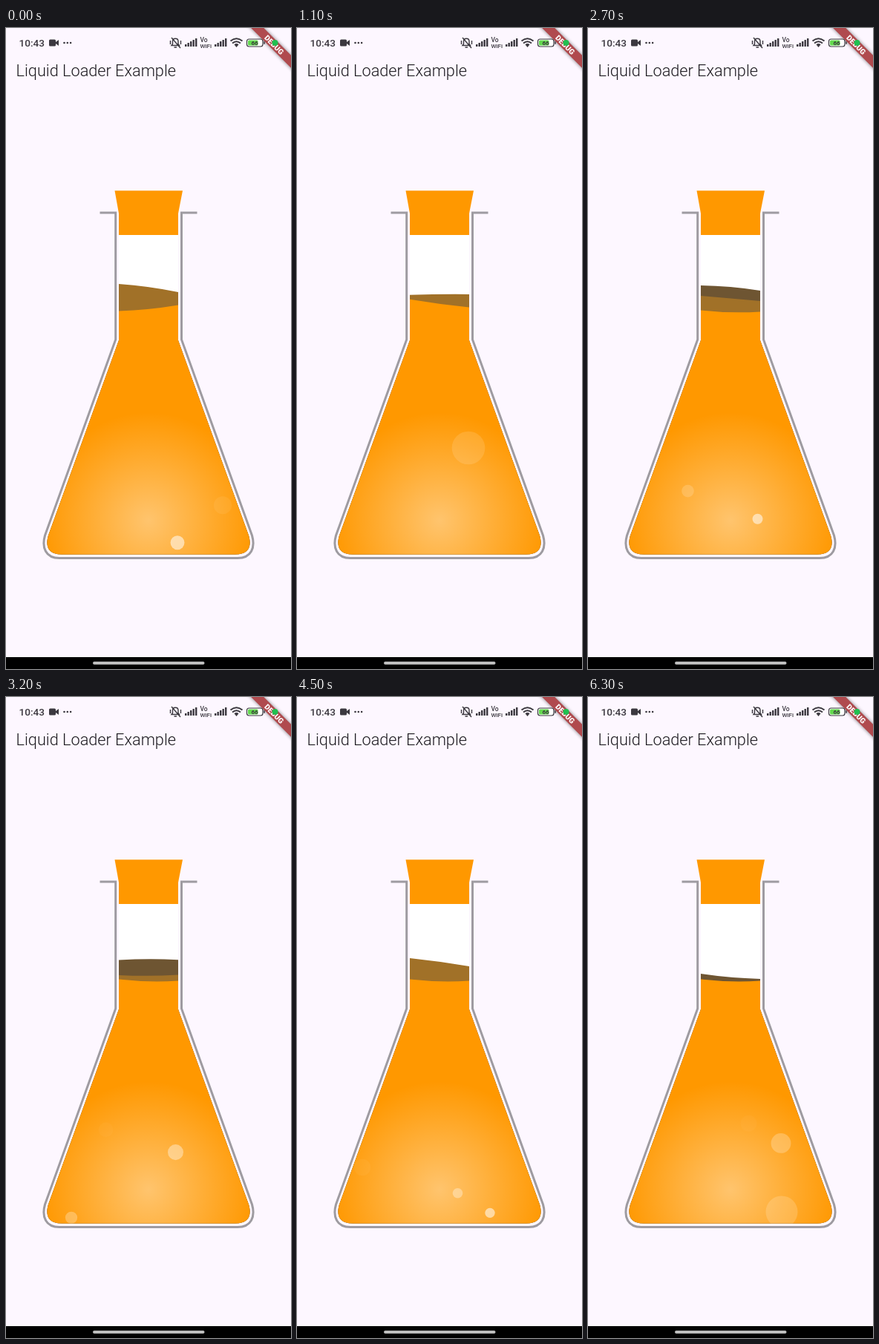
Animation of 384 by 864 pixels, one loop 6.4 s. Source, as an HTML page:

```html
<!DOCTYPE html>
<html lang="en">
<head>
<meta charset="utf-8">
<title>Liquid loader</title>
<style>
  html, body { margin: 0; width: 100%; height: 100%; overflow: hidden; background: #fdf7ff; }
  svg { display: block; width: 384px; height: 864px; font-family: Roboto, sans-serif; }
</style>
</head>
<body>
<svg viewBox="0 0 384 864" xmlns="http://www.w3.org/2000/svg">
  <defs>
    <radialGradient id="glow" gradientUnits="userSpaceOnUse" cx="192" cy="664" r="146">
      <stop offset="0" stop-color="#fff" stop-opacity=".43"/>
      <stop offset="1" stop-color="#fff" stop-opacity="0"/>
    </radialGradient>
    <path id="body" d="M152 279H232V421L327 684C331 698 328 709.5 309 709.5H75C56 709.5 53 698 57 684L152 421Z"/>
    <clipPath id="inside"><use href="#body"/></clipPath>
    <filter id="soft" x="-20%" y="-60%" width="140%" height="220%"><feGaussianBlur stdDeviation="2.5"/></filter>
    <path id="bars" d="M1.2 10V7M4.7 10V5M8.2 10V3M11.7 10V1M15.2 10V-1" stroke="#3b383f" stroke-width="2.4"/>
  </defs>
  <rect width="384" height="864" fill="#fdf7ff"/>
  <text x="13.5" y="65" font-size="21.7" font-weight="300" fill="#1d1b20">Liquid Loader Example</text>

  <!-- corner ribbon -->
  <g transform="translate(384 0) rotate(45)">
    <rect x="-45" y="26" width="90" height="12" opacity=".5" filter="url(#soft)"/>
    <rect x="-45" y="26" width="90" height="12" fill="#b04a4e"/>
    <text y="35.600" font-size="10" font-weight="900" fill="#fff" text-anchor="middle">DEBUG</text>
  </g>

  <!-- status bar -->
  <g fill="#3b383f">
    <text x="17.5" y="25" font-size="13.6" font-weight="500">10:43</text>
    <rect x="58" y="15.5" width="9" height="9" rx="1.5"/>
    <path d="M67 19L71 16V24L67 21Z"/>
    <circle cx="78.5" cy="20" r="1.3"/><circle cx="82.8" cy="20" r="1.3"/><circle cx="87.1" cy="20" r="1.3"/>
    <path d="M223 23.5H233.5L232 21.5V18C232 13 224.5 13 224.5 18V21.5ZM226.5 26H230M223 13L235 27M221.5 17V22M235.5 17V22" fill="none" stroke="#3b383f" stroke-width="1.4"/>
    <use href="#bars" x="241" y="15"/>
    <text x="261.5" y="19" font-size="8.5" font-weight="500">Vo</text>
    <text x="261.5" y="26.5" font-size="8" font-weight="500">WiFi</text>
    <use href="#bars" x="281" y="15"/>
    <path d="M302.500 17.500Q310.500 11 318.500 17.500M305 20.500Q310.500 16 316 20.500" fill="none" stroke="#3b383f" stroke-width="2"/>
    <path d="M307.500 22.200Q310.500 20 313.500 22.200L310.500 26Z"/>
    <rect x="324.500" y="15" width="21.500" height="10" rx="3" fill="#fff" stroke="#3b383f" stroke-width="1.2"/>
    <rect x="326" y="16.500" width="13.500" height="7" rx="1.500" fill="#62d84e"/>
    <text x="335" y="22.900" font-size="8" font-weight="700" text-anchor="middle">66</text>
    <rect x="347.300" y="18" width="1.500" height="4" rx=".7"/>
    <circle cx="362.500" cy="20" r="4" fill="#20c050"/>
  </g>

  <!-- flask -->
  <use href="#body" fill="#fff"/>
  <g clip-path="url(#inside)">
    <path id="back" fill="#6e5532"/>
    <path id="mid" fill="#a17128"/>
    <path id="front" fill="#ff9800"/>
    <rect x="40" y="500" width="304" height="220" fill="url(#glow)"/>
    <g id="bubbles" fill="#fff"/>
  </g>
  <path d="M146.500 219.200H238L232 250V279H152V250Z" fill="#ff9800"/>
  <path d="M126.500 249H147.700V420L52.500 684C48 700 53 714.500 72 714.500H312C331 714.500 336 700 331.500 684L236.500 420V249H257.500" fill="none" stroke="#9e9ba1" stroke-width="3"/>

  <rect y="848" width="384" height="16"/>
  <rect x="117" y="854" width="150.500" height="4" rx="2" fill="#bdbdbd"/>
</svg>
<script>
  const LOOP = 6.4, STEP = 0.1, BEAT = 0.9;
  const el = id => document.getElementById(id);

  // Heights of the two rear surfaces, one per beat.
  const BACK = [384, 384, 361, 350.5, 357, 384, 356, 376.5];
  const MID = [350.5, 358.5, 366, 364.5, 382, 357.5, 378, 384];

  // x, birth, life, depth at birth, full radius
  const BUBBLES = [
    [231, -0.14, 1.55, 710, 26],
    [292, -3.1, 3.45, 805, 13],
    [134.5, 1.1, 2.2, 755, 10.3],
    [88, 1.28, 3.45, 802, 11.8],
    [228.5, 2.5, 1.87, 681, 18.7],
    [216.5, 3, 3.45, 747, 11.3],
    [260, 4.2, 3.45, 711, 18.5],
    [261, 5.18, 1.55, 824, 26.7]
  ].map(([x, birth, life, depth, size]) => {
    const dot = document.createElementNS("http://www.w3.org/2000/svg", "circle");
    dot.setAttribute("cx", x);
    el("bubbles").append(dot);
    return { dot, birth, life, depth, size };
  });

  function heightAt(keys, t) {
    const i = Math.min(Math.floor(t / BEAT), keys.length - 1);
    const next = keys[Math.min(i + 1, keys.length - 1)];
    const ease = (1 - Math.cos(Math.PI * (t / BEAT - i))) / 2;
    return keys[i] + (next - keys[i]) * ease;
  }

  // High surfaces arch upwards, low ones sag.
  function drawSurface(id, height, tilt) {
    const ctrl = height + (height - 364) * 0.2;
    el(id).setAttribute("d",
      `M152 ${height - tilt / 2}Q192 ${ctrl} 232 ${height + tilt / 2}V420H344V720H40V420H152Z`);
  }

  // Bubbles rise, swell and fade at an even rate.
  function drawBubble({ dot, birth, life, depth, size }, t) {
    const u = (t - birth) / life;
    const alive = u >= 0 && u < 1;
    dot.setAttribute("opacity", alive ? 0.6 * (1 - u) : 0);
    if (!alive) return;
    dot.setAttribute("cy", depth - 180 * u);
    dot.setAttribute("r", size * (0.3 + 0.7 * u));
  }

  function draw(t) {
    const tilt = 5 + 6 * Math.cos(2 * Math.PI * t / 2.25);
    drawSurface("back", heightAt(BACK, t), tilt);
    drawSurface("mid", heightAt(MID, t), tilt);

    // The front surface swings once and settles.
    const fade = Math.exp(-((t / 1.8) ** 4));
    const swing = fade * Math.cos(Math.PI * t / 1.1);
    drawSurface("front", 381.5 - 8 * fade + 4 * swing, 2 - 10 * swing);

    BUBBLES.forEach(b => drawBubble(b, t));
  }

  const start = performance.now();
  function tick() {
    const t = (performance.now() - start) / 1000 % LOOP;
    draw(Math.floor(t / STEP + 1e-6) * STEP);
    requestAnimationFrame(tick);
  }
  tick();
</script>
</body>
</html>
```
